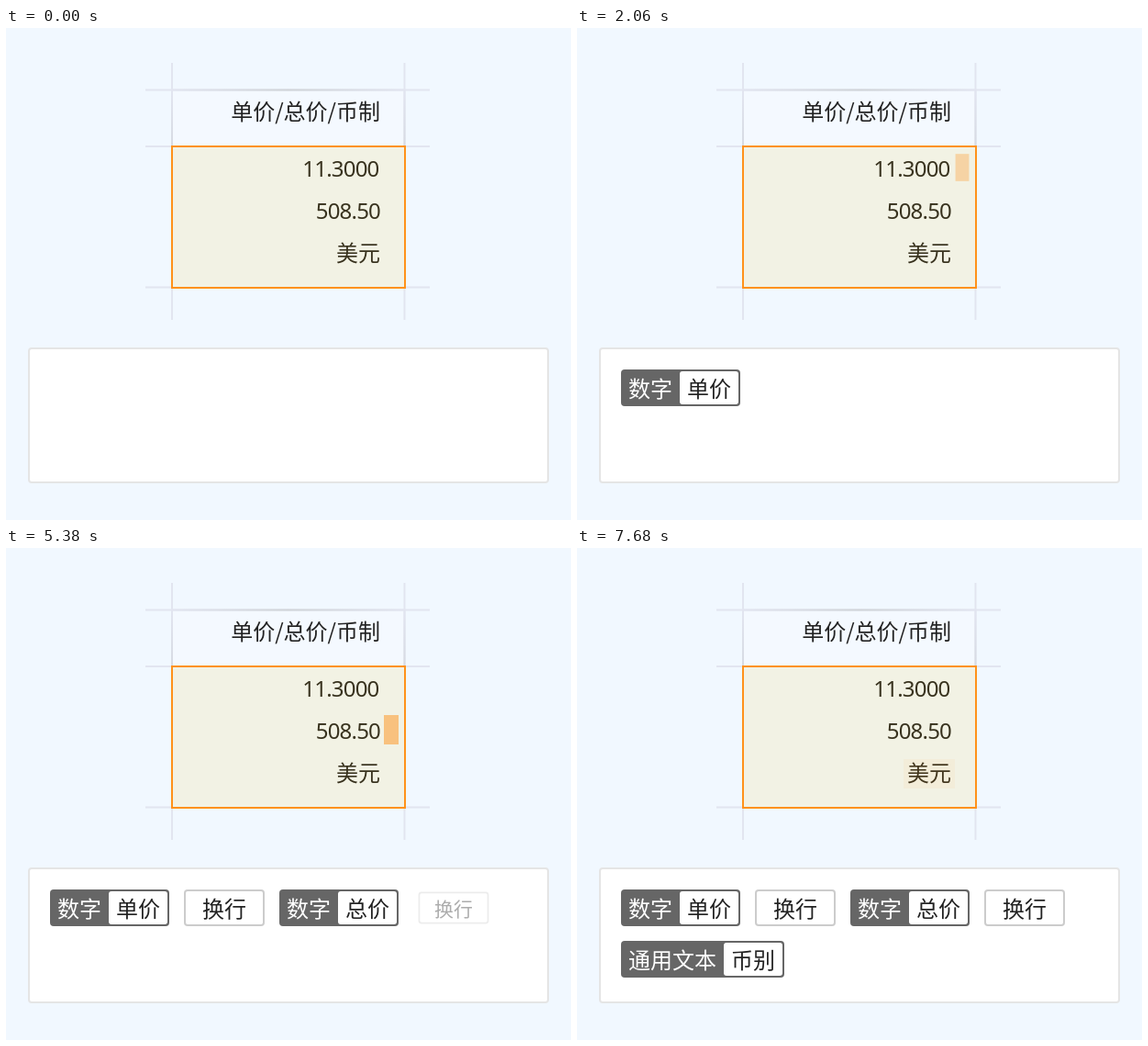
Animation of 616x536 px, one loop 8940 ms. Source, as an HTML page:

```html
<!DOCTYPE html>
<html lang="zh-CN">
<head>
<meta charset="utf-8">
<title>单元格解析</title>
<style>
  html, body { margin: 0; width: 100%; height: 100%; overflow: hidden; background: #f1f8ff; }
  svg { display: block; }
  text { font: 24px "Noto Sans CJK SC", "Noto Sans CJK", sans-serif; fill: #222; }
  .right { text-anchor: end; }
  .cell { fill: #38321e; }
  .digits { font-family: "Noto Sans", sans-serif; letter-spacing: -.8px; }
  .pop { transform-box: fill-box; transform-origin: center; opacity: 0; }
  .mark { fill: #ff921a; }
</style>
</head>
<body>
<svg id="stage" width="616" height="536" viewBox="0 0 616 536">
  <defs>
    <linearGradient id="across">
      <stop offset="0" stop-color="#e2e5f0"/>
      <stop offset=".5" stop-color="#d0d4d8"/>
      <stop offset="1" stop-color="#e2e5f0"/>
    </linearGradient>
    <linearGradient id="down" x2="0" y2="1">
      <stop offset="0" stop-color="#e2e5f0"/>
      <stop offset="1" stop-color="#d6dae2"/>
    </linearGradient>
  </defs>
  <rect x="182" y="68" width="252" height="60" fill="#f4f9ff"/>
  <path d="M152 67.5H462M152 129H462M152 282.5H462M181 38V318M434.5 38V318" stroke="#e2e5f0" stroke-width="2"/>
  <rect x="182" y="66.5" width="252" height="2" fill="url(#across)"/>
  <rect x="180" y="68" width="2" height="60" fill="url(#down)"/>
  <rect x="433.5" y="68" width="2" height="60" fill="url(#down)"/>
  <rect x="181" y="129" width="254" height="154" fill="#f2f2e4" stroke="#ff921a" stroke-width="2"/>
  <text class="right" x="408" y="100">单价/总价/币制</text>
  <text class="right cell digits" x="406.5" y="162">11.3000</text>
  <text class="right cell digits" x="408" y="208">508.50</text>
  <text class="right cell" x="408" y="254">美元</text>
  <rect x="25" y="349" width="566" height="146" rx="3" fill="#fff" stroke="#e5e5e5" stroke-width="2"/>
</svg>
<script>
const LOOP = 8940, FIRST = 290, PERIOD = 1580, FADE = 300;
const CHIP_DELAY = 240, OUT_DELAY = 830, OUT_STEP = 40;
const stage = document.getElementById('stage');

function add(parent, tag, attrs, content = '') {
  const el = document.createElementNS('http://www.w3.org/2000/svg', tag);
  for (const key in attrs) el.setAttribute(key, attrs[key]);
  el.textContent = content;
  return parent.appendChild(el);
}

function mark(x, y, width) {
  return add(stage, 'rect', { class: 'pop mark', x, y, width, height: 32 });
}

// A chip with a type label has a dark left part; without one it is a plain button.
function chip(x, y, label, type) {
  const g = add(stage, 'g', { class: 'pop' });
  if (type) {
    const split = type.length * 24 + 16;
    add(g, 'rect', { x, y, width: split + 66, height: 40, rx: 4, fill: '#666' });
    add(g, 'rect', { x: x + split, y: y + 2, width: 64, height: 36, rx: 3, fill: '#fff' });
    add(g, 'text', { x: x + 8, y: y + 30, style: 'fill:#fff' }, type);
    add(g, 'text', { x: x + split + 8, y: y + 30 }, label);
  } else {
    add(g, 'rect', { x, y, width: 88, height: 40, rx: 4, fill: '#ccc' });
    add(g, 'rect', { x: x + 2, y: y + 2, width: 84, height: 36, rx: 2, fill: '#fff' });
    add(g, 'text', { x: x + 20, y: y + 30 }, label);
  }
  return g;
}

const steps = [
  [mark(316, 136, 96), chip(48, 372, '单价', '数字')],
  [mark(412, 136, 16), chip(194, 372, '换行')],
  [mark(332, 182, 80), chip(298, 372, '总价', '数字')],
  [mark(412, 182, 16), chip(444, 372, '换行')],
  [mark(356, 230, 56), chip(48, 428, '币别', '通用文本')],
];

const clamp = v => Math.min(1, Math.max(0, v));

function pop(el, progress, opacity) {
  el.style.transform = `scale(${0.8 + 0.2 * progress})`;
  el.style.opacity = opacity;
}

function fadeOut(t) {
  if (t < 0) return 1;
  return clamp(0.9 - Math.floor(t / OUT_STEP) * OUT_STEP / FADE);
}

function draw(now) {
  const time = Math.floor(now % LOOP / 20) * 20;
  steps.forEach(([highlight, tag], i) => {
    const t = time - FIRST - i * PERIOD;
    const shown = clamp(t / FADE);
    const arrived = clamp((t - CHIP_DELAY) / FADE);
    let left = fadeOut(t - OUT_DELAY);
    // The last highlight keeps a faint trace until the loop restarts.
    if (i === steps.length - 1) left = Math.max(left, 0.1);
    pop(highlight, shown, shown * left * 0.5);
    pop(tag, arrived, arrived);
  });
  requestAnimationFrame(draw);
}
draw(performance.now());
</script>
</body>
</html>
```
